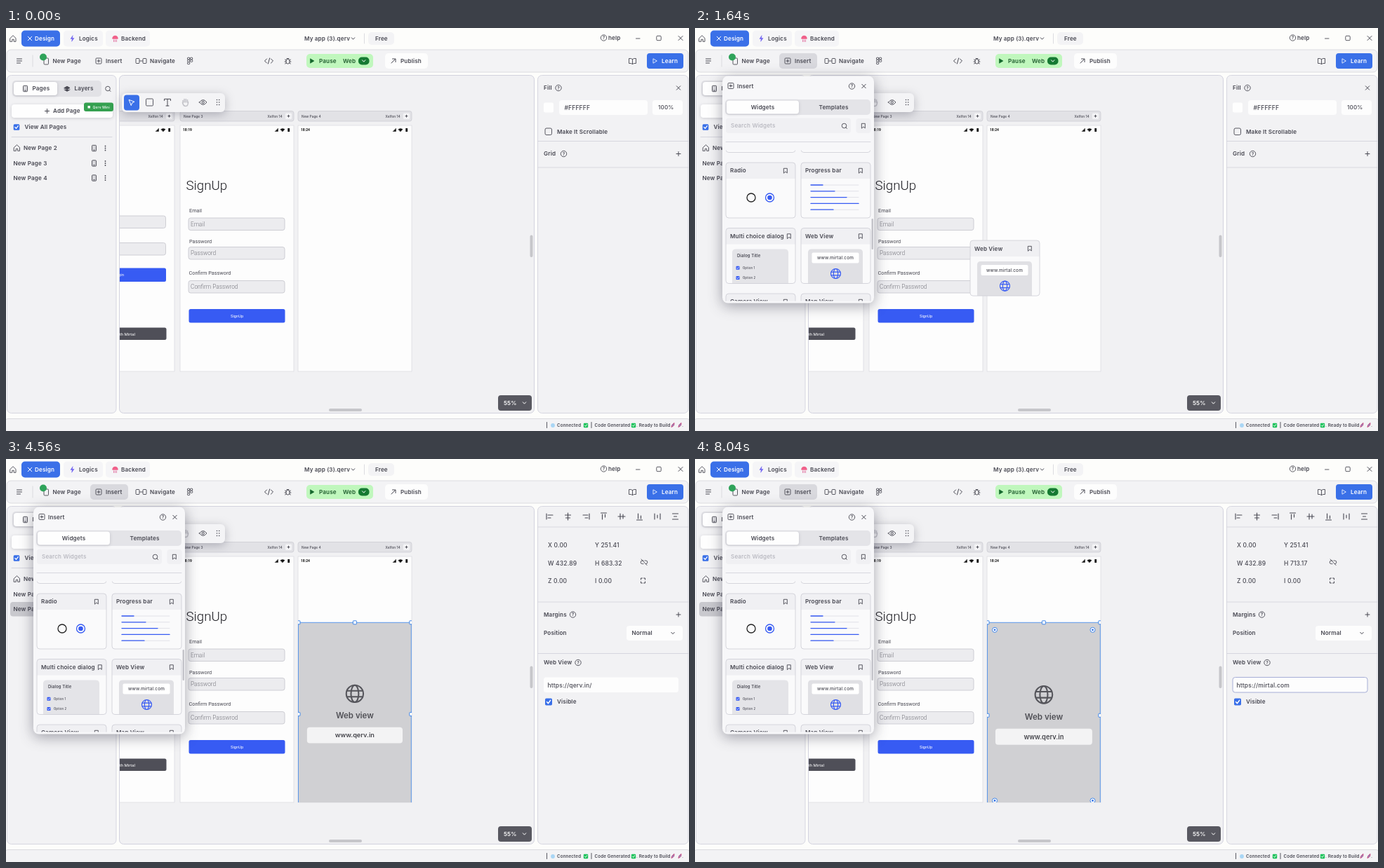
Animation of 973x575 px, one loop 8.08 s. Source, as an HTML page:

```html
<!DOCTYPE html>
<html lang="en">
<head>
<meta charset="utf-8">
<title>App builder</title>
<style>
  html, body { margin: 0; width: 100%; height: 100%; overflow: hidden; background: #fdfdfb; }
  svg { display: block; width: 973px; height: 575px; }
  text { letter-spacing: .15px; white-space: pre; }
  .phone text { letter-spacing: 0; }
  .lift { filter: drop-shadow(0 3px 7px rgba(30, 30, 50, .28)); }
  .soft { filter: drop-shadow(0 1px 2px rgba(30, 30, 50, .18)); }
</style>
</head>
<body>
<svg id="stage" viewBox="0 0 973 575" xmlns="http://www.w3.org/2000/svg"></svg>
<script>
const INK = '#484852', BLUE = '#3a70e8', VIVID = '#375bf3', LINE = '#d3d3da', GREY = '#f2f2f4';
const INTER = 'Inter, sans-serif', ROBOTO = 'Roboto, sans-serif';
const LOOP = 8080;

// Drawing helpers
const rect = (x, y, w, h, fill, r = 0, more = '') =>
  `<rect x="${x}" y="${y}" width="${w}" height="${h}" rx="${r}" fill="${fill}" ${more}/>`;
const edge = (color = LINE, w = .8) => `stroke="${color}" stroke-width="${w}"`;
const text = (x, y, s, o = {}) => {
  const { size = 8.1, weight = 600, fill = INK, font = INTER, anchor = 'start', id = '' } = o;
  return `<text ${id && `id="${id}"`} x="${x}" y="${y + size * .36}" font-family="${font}" font-size="${size}"
    font-weight="${weight}" fill="${fill}" text-anchor="${anchor}">${s}</text>`;
};
const path = (d, color = INK, w = 1, fill = 'none') =>
  `<path d="${d}" fill="${fill}" stroke="${color}" stroke-width="${w}" stroke-linecap="round" stroke-linejoin="round"/>`;
const circle = (x, y, r, fill = 'none', more = '') => `<circle cx="${x}" cy="${y}" r="${r}" fill="${fill}" ${more}/>`;
const group = (s, more = '') => `<g ${more}>${s}</g>`;
const hline = (x1, x2, y) => path(`M${x1},${y}H${x2}`, '#d0d0d8', .8);

// Icons
const cross = (x, y, r = 2.7, c = INK) => path(`M${x - r},${y - r}l${2 * r},${2 * r}m0,${-2 * r}l${-2 * r},${2 * r}`, c);
const plus = (x, y, r = 3, c = INK) => path(`M${x - r},${y}h${2 * r}M${x},${y - r}v${2 * r}`, c);
const chevron = (x, y, c = INK) => path(`M${x - 2.2},${y - 1.2}l2.2,2.4 2.2,-2.4`, c);
const box = (x, y, r) => rect(x - r, y - r, 2 * r, 2 * r, 'none', 1.2, edge(INK, .9));
const help = (x, y) => circle(x, y, 4.2, 'none', edge(INK, .9)) + text(x, y, '?', { size: 6.5, anchor: 'middle' });
const bookmark = (x, y) => path(`M${x - 2.3},${y - 3.2}h4.6v6.6l-2.3,-2 -2.3,2z`, INK, .9);
const lens = (x, y) => circle(x, y, 3.3, 'none', edge(INK, .9)) + path(`M${x + 2.4},${y + 2.4}l1.6,1.6`, INK, .9);
const device = (x, y) => rect(x - 3, y - 4.2, 6, 8.4, '#d6d6da', 1, edge(INK, .9)) + path(`M${x - 1},${y + 2.6}h2`, INK, .8);
const kebab = (x, y) => [-3, 0, 3].map(d => circle(x, y + d, .9, INK)).join('');
const home = (x, y) => path(`M${x - 4},${y - .5}l4,-3.8 4,3.8v4.8h-2.8v-3h-2.4v3h-2.8z`, INK, .9);
const tick = (x, y, r, c) => rect(x - r, y - r, 2 * r, 2 * r, c, r * .35) +
  path(`M${x - r * .5},${y}l${r * .38},${r * .45} ${r * .65},${-r * .9}`, '#fff', r * .28);
const play = (x, y, c, fill = c) => path(`M${x - 2.2},${y - 3}l5,3 -5,3z`, c, .8, fill);
const globe = (x, y, r, c) => circle(x, y, r, 'none', edge(c, r * .17)) +
  `<ellipse cx="${x}" cy="${y}" rx="${r * .45}" ry="${r}" fill="none" ${edge(c, r * .17)}/>` +
  path(`M${x - r * .9},${y - r * .35}h${r * 1.8}M${x - r * .9},${y + r * .35}h${r * 1.8}`, c, r * .17);

function topBar() {
  const tab = (x, w, s) => rect(x, 3.5, w, 23, '#f5f5f7', 5) + text(x + 22, 15, s);
  return home(10, 15) + rect(22, 3.5, 55, 23, BLUE, 5) + cross(34, 15, 2.8, '#fff') +
    text(41, 15, 'Design', { fill: '#fff' }) +
    tab(82, 56, 'Logics') + path('M95,11l-3,4.4h2.4l-.8,3.8 3.4,-4.8h-2.5z', '#6a5cf0', .5, '#6a5cf0') +
    tab(142, 63, 'Backend') + path('M152,15a3.5,3.5 0 0 1 7,0z', '#f0608a', 1.5, '#f0608a') +
    path('M153.5,17v2.5M155.5,17v2.5M157.5,17v2.5', '#e06a9a', .9) +
    text(425, 15, 'My app (3).qerv') + chevron(494.5, 15) + path('M510.500,8V22', LINE, .8) +
    rect(516, 6, 37, 18, '#f3f3f5', 5) + text(526, 15, 'Free') +
    help(851.5, 14) + text(858, 14, 'help') +
    path('M897.500,15h5.500', INK, .9) + box(930, 14.5, 3.2) + cross(961, 14.5, 3);
}

function toolbar() {
  return rect(1, 31, 971, 32, '#f3f3f5', 6, edge()) +
    path('M15.500,44h7M15.500,47h7M15.500,50h5') + path('M38,39V55', LINE, .8) +
    rect(54, 43, 6.5, 9, 'none', 1.2, edge(INK, .9)) + circle(53, 41.5, 5, '#2fa35a') + text(66.500, 47, 'New Page') +
    group(rect(120, 36, 54, 22, '#d9d9de', 5), 'id="hover"') +
    box(132, 47, 4) + plus(132, 47, 1.9) + text(142, 47, 'Insert') +
    rect(185, 43.5, 5, 7, 'none', 1, edge(INK, .9)) + rect(195, 43.5, 5, 7, 'none', 1, edge(INK, .9)) +
    path('M190.500,47h4', INK, .9) + text(205, 47, 'Navigate') +
    [0, 1].map(i => [0, 1, 2].map(j => i && j == 2 ? '' :
      rect(258.5 + i * 4, 42.2 + j * 3.3, 3.2, 2.8, 'none', .8, edge(INK, .9))).join('')).join('') +
    path('M371.500,44l-3,3 3,3M377.500,44l3,3 -3,3M375.600,43l-2.200,8') +
    rect(399, 44.5, 5, 6.5, 'none', 2.3, edge(INK, 1)) +
    path('M397.500,45l1.500,1M405.500,45l-1.500,1M397,48h2M404,48h2M397.500,51l1.500,-1M405.500,51l-1.500,-1M400,43.500h3', INK, .9) +
    rect(428, 37, 95, 20, '#c0f7bd', 5) + play(436, 47, '#14682c') +
    text(446, 47, 'Pause', { fill: '#1d5a2c' }) + text(480, 47, 'Web', { fill: '#1d5a2c' }) +
    rect(502, 41.5, 15.5, 11, '#157a32', 5) + chevron(509.7, 47, '#fff') +
    rect(540, 36, 61, 22, '#fdfdfd', 5) + path('M549,50l5.500,-5.500M550.500,44h4.500v4.500') + text(562, 47, 'Publish') +
    path('M892.500,44.500q-2,-1.500 -5,-1v7q3,-.5 5,1q2,-1.500 5,-1v-7q-3,-.5 -5,1v7', INK, .9) +
    rect(913, 36, 52, 22, BLUE, 4) + play(924.500, 47, '#fff', 'none') + text(934, 47, 'Learn', { fill: '#fff' });
}

function leftPanel() {
  const page = (y, s, x) => text(x, y, s) + device(125.500, y) + kebab(141.500, y);
  return rect(1.500, 67.500, 155.500, 482, GREY, 6, edge('#cfcfdb')) +
    rect(9, 75, 127, 23, '#e2e2e6', 5) + rect(11, 77, 62, 19, '#fefefe', 4, 'class="soft"') +
    device(27.500, 86.500) + text(37.500, 86.500, 'Pages') +
    path('M83,85.500l4,-2.300 4,2.300 -4,2.300zM83,88l4,2.300 4,-2.300', INK, .9, INK) + text(97.500, 86.500, 'Layers') + lens(145, 86.500) +
    rect(8, 109, 144, 19, '#fefefe', 4, 'class="soft"') + plus(58.500, 118.500) + text(67, 118.500, 'Add Page') +
    rect(111, 106.500, 42, 12.500, '#35a050', 3) + rect(116.500, 111, 3.500, 3.500, '#fff') +
    text(123.500, 112.800, 'Qerv Mini', { size: 5, fill: '#fff', weight: 500 }) +
    tick(15, 141.500, 4.300, BLUE) + text(26.500, 141.500, 'View All Pages') + hline(8, 151, 155.500) +
    group(rect(6, 204, 146, 20.500, '#c9c9ce', 4), 'id="pageMark"') +
    home(15.500, 171) + page(171.500, 'New Page 2', 25) + page(193, 'New Page 3', 10.500) + page(214, 'New Page 4', 10.500);
}

function phone(x, name, time) {
  const small = (px, y, s, size, weight = 300, fill = '#33333a') => text(px, y, s, { size, weight, fill, font: ROBOTO });
  const bar = rect(x, 118.500, 162, 14.500, '#e2e2e6', 3, edge('#c9c9d0', .7)) +
    text(x + 5, 126, name, { size: 4.800, weight: 500 }) + text(x + 124.500, 126, 'Xelfon 14', { size: 4.800, weight: 500 }) +
    rect(x + 150, 121.500, 9, 8.500, '#f4f4f6', 1.500) + plus(x + 154.500, 125.700, 1.500);
  const status = small(x + 4, 145.500, time, 5, 700, '#111') +
    path(`M${x + 135.500},147.500h4v-4z`, '#111', .5, '#111') + path(`M${x + 143},144.500q3,-2 6,0l-3,3.300z`, '#111', .5, '#111') +
    rect(x + 153.300, 143, 2.800, 5, '#111', .6);
  return bar + rect(x, 139, 162, 351, '#fdfdfd', 0, edge('#dcdce2')) + status;
}

function signUp() {
  const t = (x, y, s, size, weight, fill) => text(x, y, s, { size, weight, fill, font: ROBOTO });
  const field = (y, s) => rect(260, y, 137, 17.500, '#ececef', 3, edge('#c4c4cc')) + t(263, y + 8.800, s, 8.300, 300, '#74747c');
  return t(256.500, 224.500, 'SignUp', 18.700, 300, '#1c1c22') +
    t(261, 260, 'Email', 7.300, 400, INK) + field(271, 'Email') +
    t(261, 304, 'Password', 7.300, 400, INK) + field(312.500, 'Password') +
    t(260.500, 349.500, 'Confirm Password', 7.300, 400, INK) + field(360.500, 'Confirm Passwrod') +
    rect(260.500, 401, 137, 19.500, VIVID, 2.500) + t(320, 411, 'SignUp', 5.800, 400, '#fff');
}

function logIn() {
  const t = (y, s, anchor, x) => text(x, y, s, { size: 6, weight: 400, fill: '#fff', font: ROBOTO, anchor });
  return [268, 306.500].map(y => rect(91, y, 136.500, 17.500, '#ececef', 3, edge('#c4c4cc'))).join('') +
    rect(91, 342.500, 137, 19.500, VIVID, 2.500) + t(352, 'Login', 'end', 168) +
    rect(91, 427.500, 137.500, 17.500, '#4f4f58', 2.500) + t(436.500, 'Continue with Mirtal', 'end', 184);
}

function palette() {
  const dots = [-3.500, 0, 3.500].map(d => circle(300.500, 106 + d, .8, INK) + circle(303.700, 106 + d, .8, INK)).join('');
  return rect(165, 93, 147, 27, '#f4f4f6', 6, 'class="lift"') + rect(168, 95.500, 22, 22, BLUE, 4) +
    path('M175.500,102.500l7.500,2.800 -3.300,1.500 -1.300,3.400z', '#fff', 1) + box(204.500, 106, 5) +
    path('M225.500,103.500v-2.200h9v2.200M230,101.500v9.500M228,111h4') +
    path('M252,107v-3.500M254,106v-4.500M256.300,106v-4.500M258.500,106v-3.500M251.500,106.500q1,5 4.500,5t3.500,-6', '#c2c2c8', 1.500) +
    path('M275.500,106q5.200,-7 10.400,0q-5.200,7 -10.400,0z') + circle(280.700, 106, 1.600, 'none', edge(INK, 1)) + dots;
}

function canvas() {
  return rect(161.500, 67.500, 591, 482, '#f1f1f3', 6, edge('#cacad8')) +
    group(phone(78, 'New Page 2', '18:19') + logIn() + phone(248, 'New Page 3', '18:19') + signUp() +
      phone(416, 'New Page 4', '18:24'), 'class="phone" clip-path="url(#canvasClip)"') +
    '<g id="webView" class="phone" clip-path="url(#phoneClip)"></g>' +
    rect(746.500, 295.500, 4, 31.500, '#c6c6ca', 2) + rect(460, 543, 47, 4, '#c6c6ca', 2) +
    rect(701, 524, 48, 22, '#585860', 4) + text(709, 535, '55%', { fill: '#fff' }) + chevron(738.500, 535, '#fff') + palette();
}

function fillProps() {
  return text(766, 85.500, 'Fill') + help(787, 85.500) + cross(958, 85.500) +
    rect(766, 106.500, 14, 14, '#fefefe', 2) + rect(788, 103, 126, 21, '#fdfdfd', 4) +
    text(795.500, 113.500, '#FFFFFF', { size: 8.500, weight: 500 }) +
    rect(921, 103, 43, 21, '#fdfdfd', 4) + text(929, 113.500, '100%', { weight: 500 }) +
    rect(768, 143, 9.500, 9.500, 'none', 2, edge(INK, .9)) + text(785, 148, 'Make It Scrollable') + hline(758, 972, 161.500) +
    text(766, 179.500, 'Grid') + help(794.500, 179.500) + plus(958, 179.500) + hline(758, 972, 199);
}

function widgetProps() {
  const value = (x, y, s, id = '') => text(x, y, s, { size: 8.500, weight: 500, id });
  const bars = 'M-5,-4v8M-3,-2h7M-3,2h4;M0,-5v10M-4,-2h8M-3,2h6;M5,-4v8M3,-2h-7M3,2h-4;M-4,-5h8M-2,-3v7M2,-3v4;M-5,0h10M-2,-4v8M2,-3v6;M-4,5h8M-2,3v-7M2,3v-4;M-4,-4v8M4,-4v8M0,-2v4;M-4,-4h8M-4,4h8M-2,0h4'
    .split(';').map((d, i) => group(path(d, INK, 1.100), `transform="translate(${775 + i * 25.500},82)"`)).join('');
  return bars + hline(758, 972, 97) +
    value(772, 123, 'X 0.00') + value(839, 123, '', 'yVal') + value(772, 148.500, '', 'wVal') + value(839, 148.500, '', 'hVal') +
    value(772, 174, 'Z 0.00') + value(839, 174, 'I 0.00') +
    path('M908,145h-1.500a2.300,2.300 0 0 0 0,4.600h1.500M910,145h1.500a2.300,2.300 0 0 1 0,4.600M905,143l8,8.500', INK, .9) +
    path('M904.500,172v-2h2M908.500,170h2v2M910.500,175v2h-2M906.500,177h-2v-2') + hline(758, 972, 204) +
    text(766, 222, 'Margins') + help(807.500, 222) + plus(958, 222) + text(766, 248.500, 'Position') +
    rect(884, 238, 80, 21, '#fdfdfd', 4) + text(891.500, 248.500, 'Normal') + chevron(950, 248.500) + hline(758, 972, 277.500) +
    text(766, 290.500, 'Web View') + help(815, 290.500) + rect(766, 311.500, 192, 21.500, '#fdfdfd', 3.500, 'id="urlBox" stroke="none"') +
    value(771.500, 322.500, '', 'url') + tick(773, 346.500, 5, BLUE) + text(785, 346.500, 'Visible');
}

function statusBar() {
  const t = (x, s) => text(x, 567, s, { size: 6.200 });
  const rocket = x => path(`M${x - 2},569l1,-3 3,-2.500 -.5,3.500 -2.500,2z`, '#c8457d', 1, '#8a9bd0');
  return rect(-2, 557.500, 977, 20, '#f3f3f5', 5, edge()) + path('M770.500,562.500v8M834,562.500v8', INK, .9) +
    circle(779, 567, 2.900, '#a9d6f5') + t(785, 'Connected') + tick(826, 567, 3.200, '#1fc25c') +
    t(838.500, 'Code Generated') + tick(894, 567, 3.200, '#1fc25c') + t(898, '. Ready to Build') + rocket(950) + rocket(960) + t(963, '.');
}

// Insert dialog
const bodies = {
  'Icon button': (x, y) => rect(x + 38, y + 38, 23, 23, '#fff', 5, 'class="soft"') + path(`M${x + 46.500},${y + 53}l.6,-2 4.200,-4.200 1.500,1.500 -4.200,4.200z`, VIVID, .9, VIVID),
  Icons: (x, y) => [...'✉⚐⚑☻♙▬▭☼☾▯◉○★☆▱'].map((s, i) => text(x + 16 + i % 5 * 16.200, y + 35.500 + (i / 5 | 0) * 16, s,
    { size: 7, weight: 400, font: "'DejaVu Sans', sans-serif", anchor: 'middle' })).join(''),
  'Vimble Animation': (x, y) => rect(x + 9, y + 42, 16, 16, '#10dcb0', 3) +
    text(x + 28, y + 50, 'VimbleDocks', { size: 11, weight: 900, fill: '#111', font: 'Lato, sans-serif' }),
  'Text button': (x, y) => rect(x + 20.500, y + 38, 58, 24.500, VIVID, 5) + text(x + 49.500, y + 50, 'Button', { fill: '#fff', anchor: 'middle' }),
  Radio: (x, y) => circle(x + 36, y + 50, 6, 'none', edge('#222', 1.300)) + circle(x + 62.500, y + 50, 6, 'none', edge(VIVID, 1.300)) + circle(x + 62.500, y + 50, 3.300, VIVID),
  'Progress bar': (x, y) => [17, 34, 51, 68, 32].map((w, i) => path(`M${x + 14},${y + 32 + i * 8.800}h68`, '#e2e2e8', 1) +
    path(`M${x + 14},${y + 32 + i * 8.800}h${w}`, VIVID, 1.300)).join(''),
  'Multi choice dialog': (x, y) => path(`M${x + 9},${y + 79}v-44q0,-5 5,-5h70q5,0 5,5v44z`, 'none', 0, '#e4e4e8') +
    text(x + 16, y + 39, 'Dialog Title', { size: 5.800 }) +
    [1, 2].map(n => tick(x + 17, y + 42.500 + n * 14.300, 2.500, VIVID) + text(x + 24, y + 42.500 + n * 14.300, 'Option ' + n, { size: 4.200, weight: 500 })).join(''),
  'Web View': (x, y) => path(`M${x + 10},${y + 79}v-44q0,-5 5,-5h68q5,0 5,5v44z`, 'none', 0, '#e0e0e4') +
    rect(x + 15.500, y + 35, 67, 15, '#fff', 2) + text(x + 49, y + 42.500, 'www.mirtal.com', { size: 6.400, weight: 500, anchor: 'middle' }) + globe(x + 49.500, y + 65, 7, VIVID),
};
function card(x, y, title) {
  return rect(x, y, 99, 79, '#fafafb', 4) + path(`M${x},${y + 23}v-19q0,-4 4,-4h91q4,0 4,4v19z`, 'none', 0, '#f0f0f3') +
    (bodies[title] ? bodies[title](x, y) : '') + rect(x, y, 99, 79, 'none', 4, edge('#cdcdd5')) +
    text(x + 6, y + 11.500, title) + bookmark(x + (title.length > 16 ? 90 : 85), y + 11.500);
}
const widgets = ['Text', 'Image', 'Icon button', 'Icons', 'Vimble Animation', 'Text button', 'Appbar', 'Checkbox',
  'Switch', 'Slider', 'Radio', 'Progress bar', 'Multi choice dialog', 'Web View', 'Camera View', 'Map View'];

function dialog() {
  return rect(39, 68.500, 216, 324, '#f7f7f9', 8, 'style="filter:drop-shadow(0 4px 10px rgba(30,30,50,.4))"') +
    box(51, 82.500, 4) + plus(51, 82.500, 1.900) + text(60, 83, 'Insert') + help(223.500, 83) + cross(240.500, 83) +
    rect(43, 102, 207, 22, '#e4e4e8', 5) + rect(45, 103.500, 103, 19, '#fefefe', 4, 'class="soft"') +
    text(96.500, 113, 'Widgets', { anchor: 'middle' }) + text(197.500, 113, 'Templates', { anchor: 'middle' }) +
    rect(44, 128.500, 178, 21.500, '#f0f0f3', 4) + text(51, 139.500, 'Search Widgets', { fill: '#b4b4bc', weight: 500 }) + lens(212.500, 139.500) +
    rect(229.500, 129, 21, 21, '#f0f0f3', 4) + bookmark(240, 139.500) + hline(44, 250, 162.500) +
    group(group(widgets.map((w, i) => card(i % 2 ? 151 : 44, 180 + (i >> 1) * 93.500, w)).join(''), 'id="list"'), 'clip-path="url(#listClip)"') +
    rect(251.500, 175, 2.500, 44, '#c4c4ca', 1.200, 'id="thumb"');
}

const clip = (id, x, y, w, h) => `<clipPath id="${id}">${rect(x, y, w, h, '#000')}</clipPath>`;
document.getElementById('stage').innerHTML =
  `<defs>${clip('canvasClip', 162, 68, 590, 481)}${clip('phoneClip', 416, 139, 162, 351)}${clip('listClip', 40, 174.500, 214, 215)}</defs>` +
  rect(0, 0, 973, 575, '#fdfdfb') + topBar() + toolbar() + leftPanel() + canvas() +
  rect(757.500, 67.500, 214.500, 482, GREY, 6, edge('#cfcfdb')) +
  group(fillProps(), 'id="fillProps"') + group(widgetProps(), 'id="widgetProps"') + statusBar() +
  group(dialog(), 'id="dialog"') + group(card(151, 285.500, 'Web View'), 'id="dragged"');

// Motion
const el = id => document.getElementById(id);
const show = (id, on) => { el(id).style.display = on ? '' : 'none'; };
const put = (id, s) => { if (el(id).textContent !== s) el(id).textContent = s; };
const ease = (t, from, to) => { const u = Math.min(1, Math.max(0, (t - from) / (to - from))); return u * u * (3 - 2 * u); };
const mix = (a, b, u) => a + (b - a) * u;
const SCALE = .3715, DROP = 1880;
const corner = [2280, 3261], top_ = [3800, 4240], bottom = [4360, 4680];
const within = (t, [a, b]) => t >= a && t < b;

function geometry(t) {
  const rise = 74.570 * ease(t, ...top_);
  return {
    y: 325.980 - rise,
    w: mix(200, 432.890, ease(t, corner[0], corner[1])),
    h: mix(300, 608.750, ease(t, corner[0], 3211)) + rise + 29.850 * ease(t, ...bottom),
  };
}

function webView(t) {
  const g = geometry(t), x = 416.500, y = 139.900 + g.y * SCALE, w = g.w * SCALE, h = g.h * SCALE;
  const cx = x + w / 2, cy = y + h / 2, k = h / 265;
  const active = within(t, corner) ? '1,1' : t >= 3600 && t < top_[1] ? '0.5,0' : within(t, bottom) ? '0.5,1' : '';
  const dragging = [corner, top_, bottom].some(span => within(t, span));
  const label = (dy, s) => text(cx, cy + dy * k, s, { size: 11.600 * k, fill: '#505056', anchor: 'middle' });
  let s = rect(x, y, w, h, '#d0d0d3', 0, edge('#5b98ea', 1)) + globe(cx, cy - 29.500 * k, 12.300 * k, '#55555b') +
    label(1.800, 'Web view') + rect(cx - 69 * k, cy + 19 * k, 138 * k, 23 * k, '#f3f3f4', 4 * k) +
    text(cx, cy + 30.500 * k, 'www.qerv.in', { size: 9.300 * k, fill: '#46464c', anchor: 'middle' });
  for (const u of [0, .5, 1]) for (const v of [0, .5, 1]) {
    if (u === .5 && v === .5) continue;
    s += rect(x + u * w - 2.500, y + v * h - 2.500, 5, 5, `${u},${v}` === active ? '#2f6fe6' : '#fff', .5, edge('#4388e8', 1));
    if (!dragging && u !== .5 && v !== .5) {
      const px = x + w * u + (u ? -10.800 : 10.500), py = y + h * v + (v ? -10.800 : 10.500);
      s += circle(px, py, 3.500, '#fff', edge('#4388e8', 1)) + circle(px, py, 1.400, '#2f6fe6');
    }
  }
  if (dragging) s += rect(cx - 19.500, y + h + 5.800, 39, 13.500, '#4a90ec', 2) +
    text(cx, y + h + 12.500, `${Math.round(g.w)} × ${Math.round(g.h)}`, { size: 6.900, weight: 500, fill: '#fff', anchor: 'middle' });
  return s;
}

function url(t) {
  const kept = Math.max(0, 8 - Math.max(0, Math.floor((t - 5600) / 75)));
  const typed = Math.max(0, Math.floor((t - 6480) / 120));
  return 'https://' + 'qerv.in/'.slice(0, kept) + 'mirtal.com'.slice(0, typed);
}

function render(t) {
  const dropped = t >= DROP;
  show('hover', t >= 80);
  show('dialog', t >= 200);
  const scroll = 455.500 * ease(t, 400, 1136);
  el('list').setAttribute('transform', `translate(0,${-scroll})`);
  el('thumb').setAttribute('y', 175 + scroll * .213);

  show('dragged', t >= 1240 && !dropped);
  const carry = ease(t, 1240, 1760);
  el('dragged').setAttribute('transform', `translate(${278 * carry},${20.300 * carry})`);

  show('pageMark', dropped);
  show('fillProps', !dropped);
  show('widgetProps', dropped);
  el('webView').innerHTML = dropped ? webView(t) : '';

  // The readouts follow only when a handle is released.
  const held = [corner, top_, bottom].find(span => within(t, span));
  const g = geometry(held ? held[0] : t);
  put('yVal', 'Y ' + g.y.toFixed(2));
  put('wVal', 'W ' + g.w.toFixed(2));
  put('hVal', 'H ' + g.h.toFixed(2));
  put('url', url(t));
  el('urlBox').setAttribute('stroke', t >= 4960 ? '#a6aed6' : 'none');
}

function tickFrame() {
  render(performance.now() % LOOP);
  requestAnimationFrame(tickFrame);
}
tickFrame();
</script>
</body>
</html>
```
